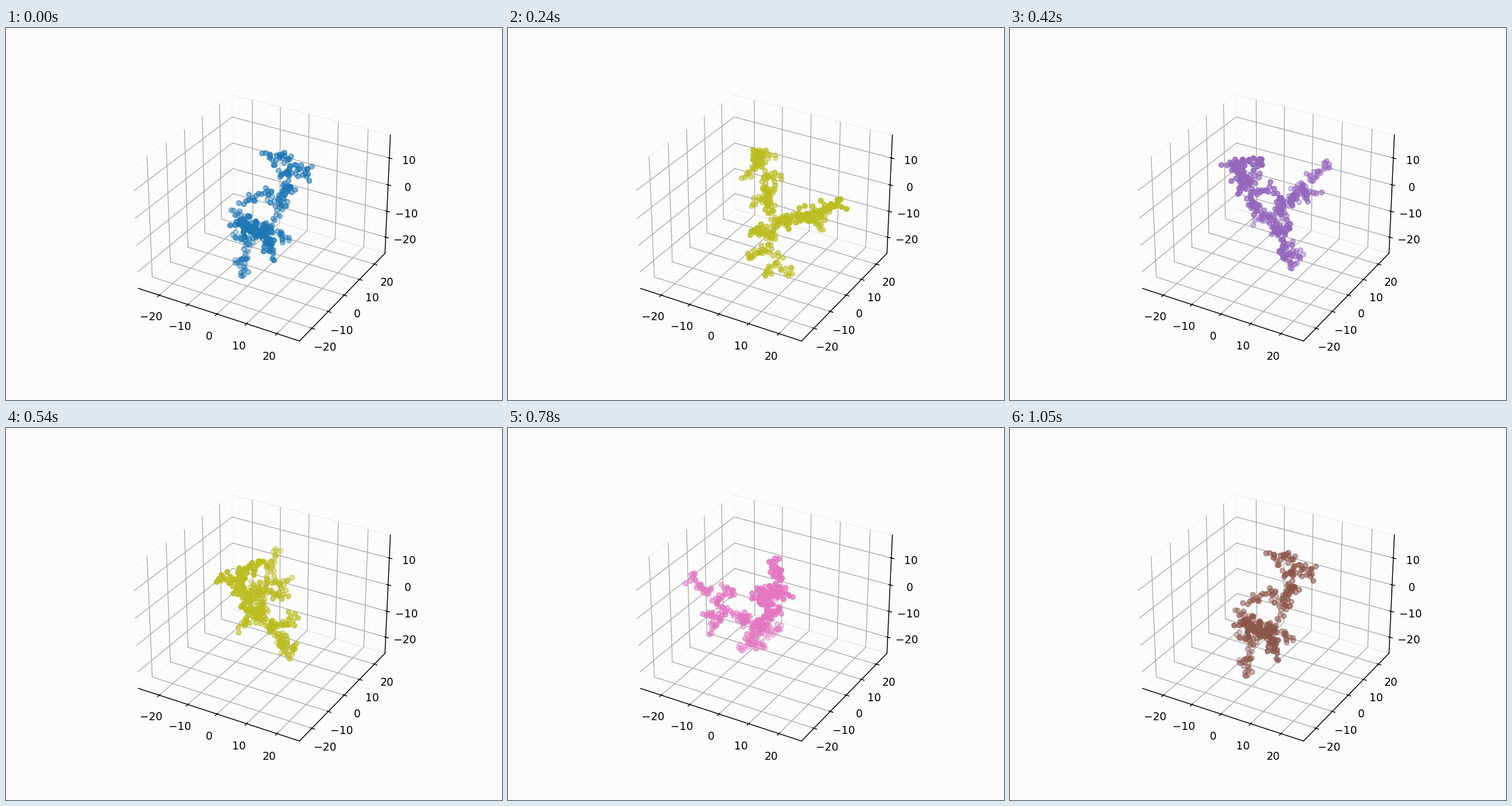
Animation, 864 px wide and 648 px high, one loop 1080 ms. Source, as a matplotlib script:

```python
import matplotlib.pyplot as plt
import numpy as np
from matplotlib.animation import ArtistAnimation

FRAMES = 36
INTERVAL = 30
START = np.radians(30)  # key points are (right, away, up) as seen at azim=-60
BACKGROUND = "#fcfcfc"

# Root of the cluster, then the bends and tips its branches reach for.
KEYS = [
    (1, -4, -9), (5, 1, -2), (6, 1, 6), (9, 4, 11), (6, 4.7, 15),
    (1.8, 1.7, 15.6), (12.9, 0.6, 9.6), (7, -3, 5.5), (5, 8, 4.9),
    (-1.6, -0.6, 3.2), (-7.4, -1.7, 0.4), (1, 4, -2),
    (-2.5, 0, -10.5), (-8.4, 2, -6.5), (-5.4, -1.6, -15.6),
    (-6.5, -7.6, -23.3), (-7.7, -0.7, -22.6), (-8.4, 4, -16),
    (7.4, -3.4, -11.5), (-1.5, -13, -3.5), (-5.5, -22.5, 6),
    (-8, -12, 0), (2.9, -16.8, -11), (2.3, -18.6, -3.8),
]


def grow(keys, step=0.95, wobble=0.55, extra=165, reach=1.7, seed=4):
    """Grow a branch to each key from the nearest particle, then let
    extra particles stick to random places on the cluster."""
    rng = np.random.default_rng(seed)
    cluster = np.array(keys[:1], float)
    for key in np.array(keys[1:], float):
        base = cluster[np.argmin(np.linalg.norm(cluster - key, axis=1))]
        count = int(np.ceil(np.linalg.norm(key - base) / step))
        t = np.arange(1, count + 1)[:, None] / count
        noise = rng.normal(0, wobble, (count, 3))
        noise[-1] = 0
        cluster = np.vstack([cluster, base + t * (key - base) + noise])
    for _ in range(extra):
        offset = rng.normal(size=3)
        offset *= reach / np.linalg.norm(offset)
        cluster = np.vstack([cluster, rng.choice(cluster) + offset])
    return cluster.T


def turn(points, angle):
    """Rotate the points about the vertical axis."""
    x, y, z = points
    c, s = np.cos(angle), np.sin(angle)
    return c * x - s * y, s * x + c * y, z


fig = plt.figure(figsize=(6.4, 4.8), dpi=135, facecolor=BACKGROUND)
ax = fig.add_subplot(projection="3d", facecolor=BACKGROUND)
ax.view_init(elev=30, azim=-60)
for axis in (ax.xaxis, ax.yaxis, ax.zaxis):
    axis.pane.set_fill(False)

cluster = grow(KEYS)
angles = START + np.linspace(0, 2 * np.pi, FRAMES)
poses = [
    [ax.scatter(*turn(cluster, angle), color=f"C{i % 10}")]
    for i, angle in enumerate(angles)
]

ax.set_xticks(range(-20, 21, 10))
ax.set_yticks(range(-20, 21, 10))
ax.set_zticks(range(-20, 11, 10))
ax.tick_params(pad=3.2)
ax.set_xlim(-27.34, 27.34)
ax.set_ylim(-27.34, 27.34)
ax.set_zlim(-26.33, 18.39)

anim = ArtistAnimation(fig, poses, interval=INTERVAL, repeat=True,
                       repeat_delay=0, blit=False)
plt.show()
```
